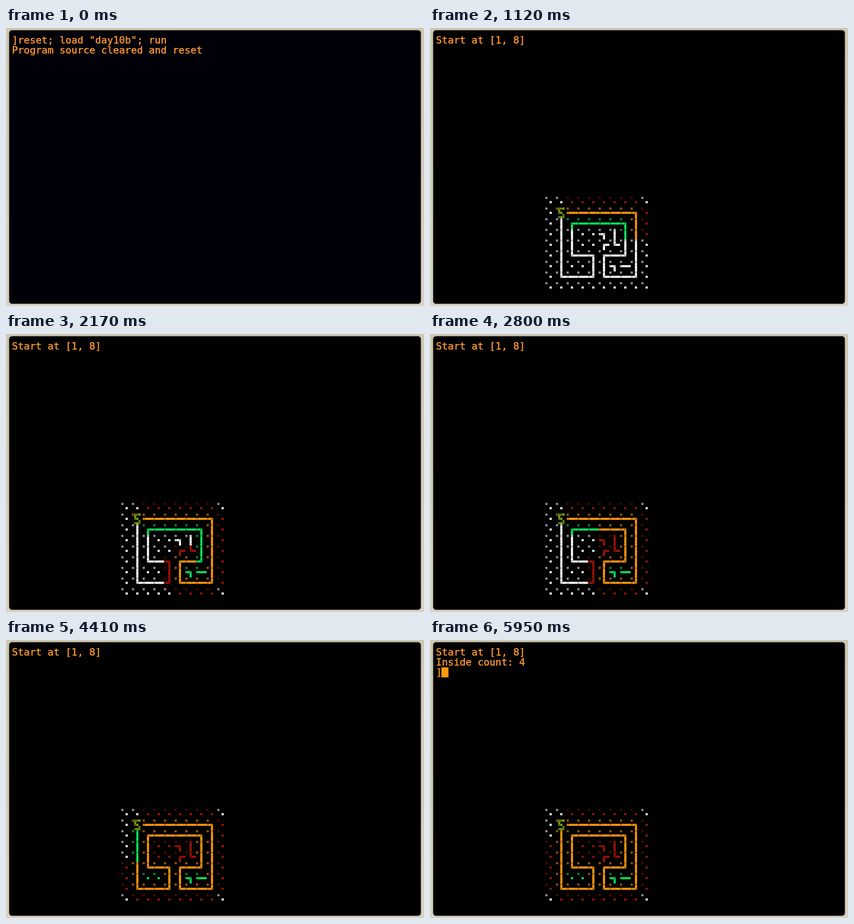
Animation, 917 px wide and 610 px high, one loop 6230 ms. Source, as an HTML page with a canvas:

```html
<!DOCTYPE html>
<html lang="en">
<head>
<meta charset="utf-8">
<title>Pipe loop</title>
<style>
html, body { margin: 0; width: 100%; height: 100%; overflow: hidden; background: #d3ccb9; }
canvas { display: block; }
</style>
</head>
<body>
<canvas id="stage" width="917" height="610"></canvas>
<script>
const ctx = document.getElementById('stage').getContext('2d');
const LOOP = 6230, TICK = 70, LAST_STEP = 43;
const PIXEL = 4.68, TILE = 5 * PIXEL, LEFT = 253, TOP = 370.5;

const MAP = [
  '..........',
  '.S------7.',
  '.|F----7|.',
  '.||..7|||.',
  '.||..FL||.',
  '.|L-7F-J|.',
  '.|..||7-|.',
  '.L--JL--J.',
  '..........'
];

const WHITE = [255, 255, 255], ORANGE = [255, 153, 16];
const GREEN = [8, 232, 98], RED = [158, 20, 4];
const TEXT = '#ff9a2e';

// Arms of each pipe, as lists of [column, row] inside a 5 x 5 tile
const ARMS = {
  W: [[0, 2], [1, 2]], E: [[3, 2], [4, 2]],
  N: [[2, 0], [2, 1]], S: [[2, 3], [2, 4]]
};
const PIPES = { '-': 'WE', '|': 'NS', '7': 'WS', 'J': 'WN', 'L': 'NE', 'F': 'ES', '.': '' };
const START_GLYPH = ['aaab', ' b', ' ab', '   a', ' aba'];

const rgb = (color, level = 1) => `rgb(${color.map(c => Math.round(c * level))})`;

function pixel(col, row, x, y, style) {
  ctx.fillStyle = style;
  ctx.fillRect(LEFT + col * TILE + x * PIXEL, TOP + row * TILE + y * PIXEL, PIXEL, PIXEL);
}

// Walks the loop, colouring the cells to its left and right
function colorCells(steps) {
  const cells = MAP.map(line => [...line].map(() => WHITE));
  let x = 1, y = 1, dx = 1, dy = 0;
  const mark = (cx, cy, color) => {
    if (MAP[cy][cx] !== 'S' && cells[cy][cx] !== ORANGE) cells[cy][cx] = color;
  };
  const markSides = () => {
    mark(x + dy, y - dx, RED);
    mark(x - dy, y + dx, GREEN);
  };
  for (let n = 1; n <= steps; n++) {
    x += dx;
    y += dy;
    cells[y][x] = ORANGE;
    if (n === LAST_STEP) break;
    markSides();
    const pipe = MAP[y][x];
    if ('7L'.includes(pipe)) [dx, dy] = [dy, dx];
    else if ('JF'.includes(pipe)) [dx, dy] = [-dy, -dx];
    else continue;
    markSides();
  }
  return cells;
}

function drawTile(col, row, color) {
  const pipe = MAP[row][col];
  const corner = '7JLF'.includes(pipe);
  pixel(col, row, 0, 0, rgb(color, color === RED ? 0.46 : 0.57));
  pixel(col, row, 2, 2, rgb(color, corner ? 0.77 : 1));
  for (const arm of PIPES[pipe]) {
    for (const [x, y] of ARMS[arm]) {
      pixel(col, row, x, y, rgb(color, x && y ? 1 : 0.8));
    }
  }
}

function drawStart(fresh) {
  const shades = fresh ? { a: '#45b9ef', b: '#8feaff' } : { a: '#5d7a0a', b: '#86a018' };
  START_GLYPH.forEach((line, y) => [...line].forEach((key, x) => {
    if (key !== ' ') pixel(1, 1, x, y, shades[key]);
  }));
  if (!fresh) pixel(1, 1, 0, 0, '#80501a');
}

function drawMap(frame) {
  // The walk lags slightly after the first corner
  const delay = frame < 850 ? 53 : 113;
  const steps = Math.min(LAST_STEP, Math.max(0, Math.floor((frame - delay) / 106)));
  colorCells(steps).forEach((line, row) => line.forEach((color, col) => {
    if (MAP[row][col] === 'S') drawStart(frame < 350);
    else drawTile(col, row, color);
  }));
}

function print(line, text) {
  const y = 33.5 + line * 22.4;
  ctx.fillStyle = ctx.strokeStyle = TEXT;
  ctx.lineWidth = 0.5;
  ctx.font = '21.7px "DejaVu Sans Mono", monospace';
  ctx.fillText(text, 13, y);
  ctx.strokeText(text, 13, y);
}

function drawScreen(color) {
  const bezel = ctx.createLinearGradient(0, 0, 0, 610);
  bezel.addColorStop(0, '#cec7b2');
  bezel.addColorStop(1, '#dad2c2');
  ctx.fillStyle = bezel;
  ctx.fillRect(0, 0, 917, 610);
  ctx.fillStyle = color;
  ctx.beginPath();
  ctx.roundRect(7, 5, 903, 600, 6);
  ctx.fill();
  ctx.strokeStyle = '#4a463c';
  ctx.lineWidth = 1;
  ctx.stroke();
}

function draw(time) {
  const frame = Math.floor(time % LOOP / TICK) * TICK;
  if (frame < 70) {
    drawScreen('#000009');
    print(0, ']reset; load "day10b"; run');
    print(1, 'Program source cleared and reset');
  } else {
    drawScreen('#000');
    print(0, 'Start at [1, 8]');
    drawMap(frame);
    if (frame >= 4760) {
      print(1, 'Inside count: 4');
      print(2, ']');
      if (frame < 5600 || frame >= 5880) {
        ctx.fillStyle = '#ff980c';
        ctx.fillRect(25, 60, 15.5, 22);
      }
    }
  }
}

const began = performance.now();
function tick() {
  draw(performance.now() - began);
  requestAnimationFrame(tick);
}
tick();
</script>
</body>
</html>
```
